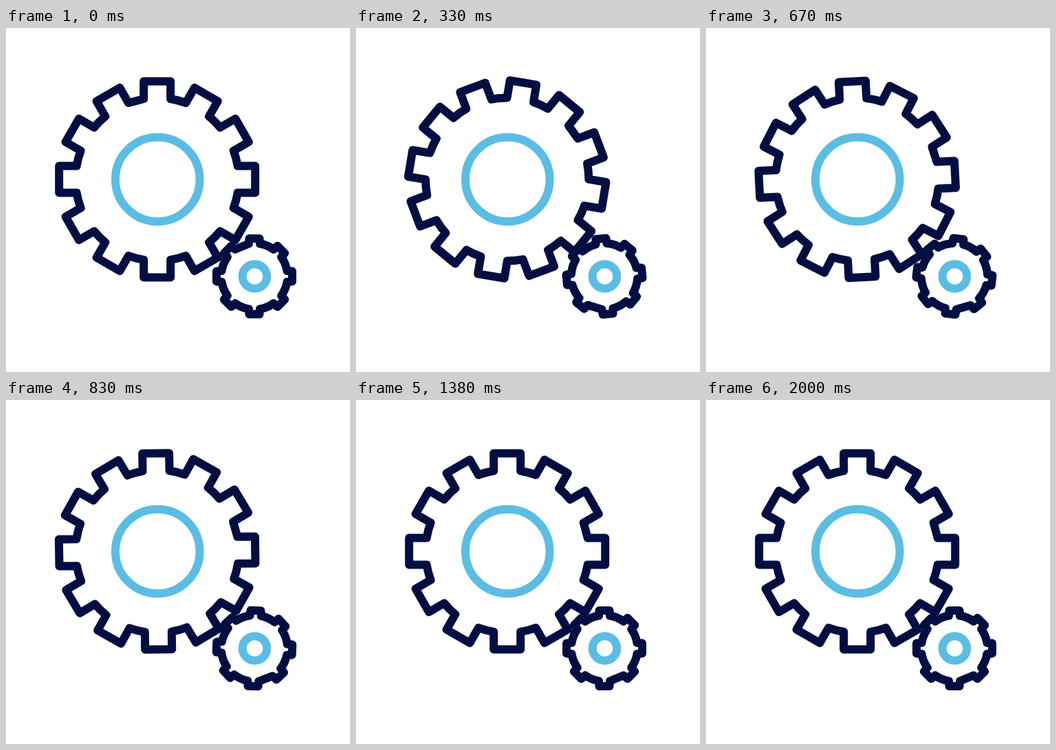
Write an HTML page that moves like this. It is 500 px wide and 500 px high and loops after 2.04 s.

```html
<!DOCTYPE html>
<html lang="en">
<head>
<meta charset="utf-8">
<title>Gears</title>
<style>
  html, body { margin: 0; width: 100%; height: 100%; overflow: hidden; background: #fff; }
  svg { display: block; width: 100vw; height: 100vh; }
  path, circle { fill: none; stroke-width: 12; stroke-linejoin: round; }
  path { stroke: #000e41; }
  circle { stroke: #5bbde4; }
  #small { fill: #fff; }
</style>
</head>
<body>
<svg viewBox="0 0 500 500">
  <path id="big"/>
  <circle cx="220.3" cy="220" r="61.3"/>
  <path id="small"/>
  <circle cx="361.5" cy="361" r="17.8"/>
</svg>
<script>
const LOOP = 2040, FPS = 24, LAST = 48;

// Outline around the origin: each tooth runs base, tip, tip, base, then an arc to the next.
function gearPath(teeth, tipHalf, tipR, baseHalf, baseR) {
  const tooth = [[-baseHalf, -baseR], [-tipHalf, -tipR], [tipHalf, -tipR], [baseHalf, -baseR]];
  const arc = Math.hypot(baseHalf, baseR);
  let d = '';
  for (let i = 0; i < teeth; i++) {
    const a = i * 2 * Math.PI / teeth, c = Math.cos(a), s = Math.sin(a);
    tooth.forEach(([x, y], j) => {
      const cmd = j ? 'L' : i ? `A${arc} ${arc} 0 0 1 ` : 'M';
      d += `${cmd}${(x * c - y * s).toFixed(2)} ${(x * s + y * c).toFixed(2)}`;
    });
  }
  return d + 'Z';
}

const gears = [
  { id: 'big', x: 219.7, y: 220, turn: 90, time: 1530, power: 6, shape: [12, 19.5, 142.5, 19.5, 117] },
  { id: 'small', x: 361, y: 361, turn: -180, time: 2000, power: 8.3, shape: [8, 7.5, 55, 8, 47.5] }
];
for (const g of gears) {
  g.el = document.getElementById(g.id);
  g.el.setAttribute('d', gearPath(...g.shape));
}

function draw(now) {
  // Steps at 24 per second, starting on rounded 10 ms ticks.
  const step = Math.min(LAST, Math.floor((now % LOOP + 4) * FPS / 1000));
  const t = step * 1000 / FPS;
  for (const g of gears) {
    const left = Math.max(0, 1 - t / g.time) ** g.power;
    const angle = g.turn * (1 - left);
    g.el.setAttribute('transform', `translate(${g.x} ${g.y}) rotate(${angle})`);
  }
}

const start = performance.now();
function loop() {
  draw(performance.now() - start);
  requestAnimationFrame(loop);
}
loop();
</script>
</body>
</html>
```
